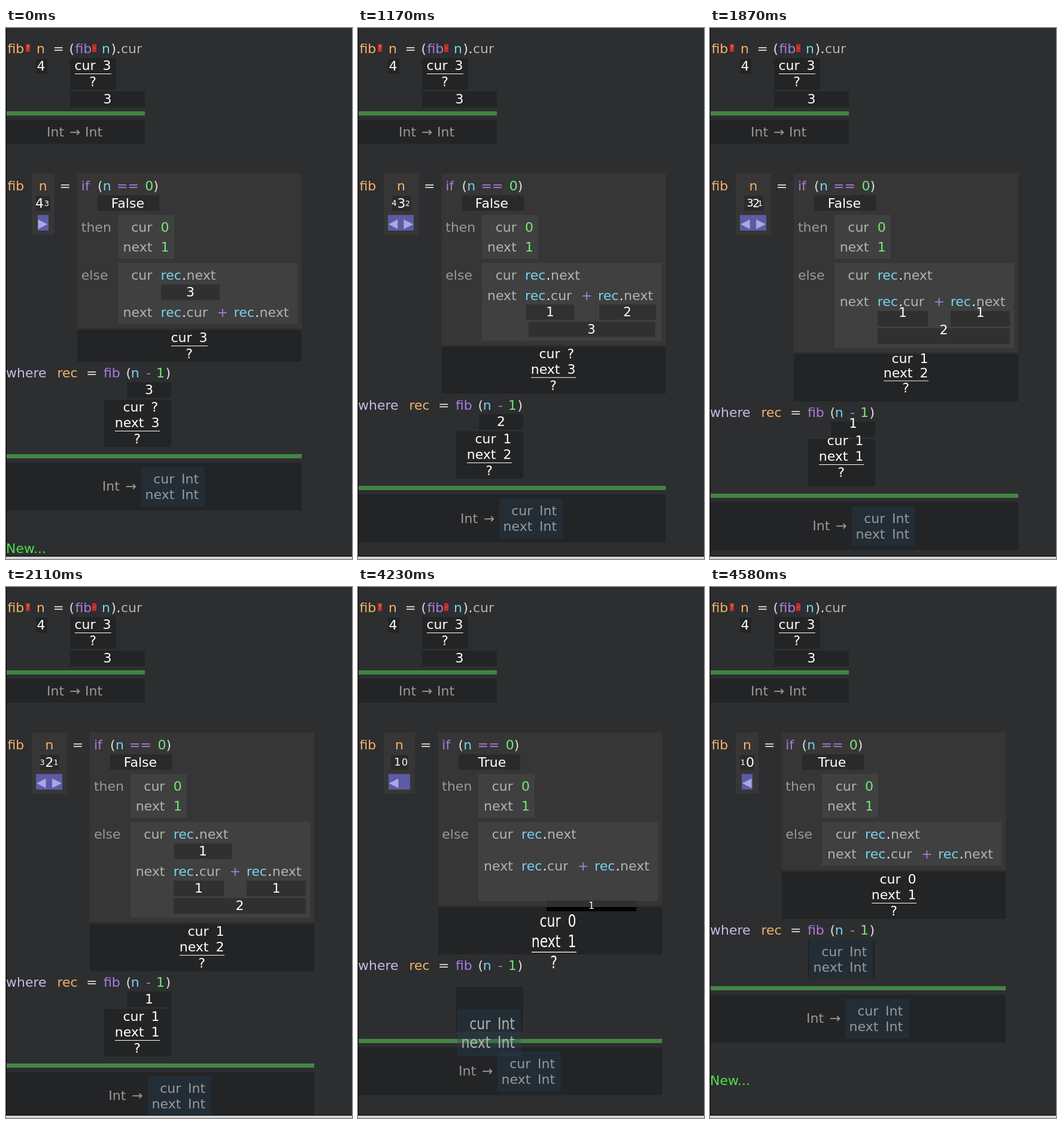
An HTML page with a canvas that plays this animation: 578 by 886 pixels, repeating every 4900 ms.

```html
<!DOCTYPE html>
<html lang="en">
<head>
<meta charset="utf-8">
<title>Stepping through fib</title>
<style>
html, body { margin: 0; width: 100%; height: 100%; overflow: hidden; background: #2d2e30; }
canvas { display: block; }
</style>
</head>
<body>
<canvas id="stage" width="578" height="886"></canvas>
<script>
const ctx = document.getElementById('stage').getContext('2d');
const LOOP = 4900, DECAY = 0.0194;
const C = {
  bg: '#2d2e30', dark: '#232426', body: '#363636', inner: '#404040', value: '#303030',
  slot: '#2a2a2a', white: '#ffffff', pale: '#dedede', label: '#b2b2b2', dim: '#999999',
  orange: '#f4b266', purple: '#aa7bdc', cyan: '#78d2ec', green: '#78e878', lilac: '#c3bce2',
  bar: '#448544', record: 'rgba(38,68,87,.3)', red: '#bd2f26',
  slider: '#5d5ba5', arrow: '#a9a8e0', fresh: '#4be34b'
};

// Layout: bx = body left, yN = "next" row, elseB = bottom of the else record,
// resH = result height, fo / fh = offset and height of the box below "where".
const wide = { bx: 140.4, yN: 475, elseB: 552, resH: 79, fo: 44, fh: 79 };
const first = { ...wide, bx: 119.3, yN: 475, elseB: 494, resH: 53 };
const three = { ...wide, yN: 446, elseB: 523 };
const last = { ...wide, bx: 119.8, yN: 446, elseB: 465, fo: 15, fh: 66 };
const still = { dx: 0, dy: 0, resDy: 0, sc: 1 };

// Digit entries: char, x and size at the start, x and size at rest.
const slide = (a, b, c) => [[a, 67, 18, 60.5, 13], [b, 77, 19, 72.5, 22], [c, 84, 13, 83.5, 13]];
const pair = (a, b) => [['cur', a], ['next', b]];

const phases = [
  { t0: 0, steps: 0, n: 4, a: first, b: first, ...still,
    digits: [['4', 56, 22, 56, 22], ['3', 68, 13, 68, 13]],
    curV: '3', res: [['cur', '3']], arg: '3', frac: pair('?', '3') },
  { t0: 1010, gap: 160 / 3, steps: 6, n: 3, b: three,
    a: { ...wide, bx: 126.3, yN: 465, elseB: 504, resH: 61 },
    dx: -7, dy: -18, resDy: -24, sc: 0.87, enterSum: true,
    digits: [['4', 57, 19, 60.5, 13], ['3', 70, 16, 72.5, 22], ['2', 71, 13, 83.5, 13]],
    sum: ['1', '2', '3'], res: pair('?', '3'), arg: '2', frac: pair('1', '2') },
  { t0: 1870, gap: 140 / 3, steps: 6, n: 2, b: wide,
    a: { ...wide, yN: 457, elseB: 534 },
    dx: 0, dy: -10, resDy: -4, sc: 0.93, enterCur: true,
    digits: slide('3', '2', '1'),
    curV: '1', sum: ['1', '1', '2'], res: pair('1', '2'), arg: '1', frac: pair('1', '1') },
  { t0: 3000, gap: 50, steps: 2, n: 1, a: wide, b: wide, ...still,
    digits: slide('2', '1', '0'),
    curV: '1', sum: ['0', '1', '1'], res: pair('1', '1'), arg: '0', frac: pair('0', '1') },
  { t0: 4230, gap: 50, steps: 7, n: 0, b: last,
    a: { bx: 133.8, yN: 466, elseB: 524, resH: 79, fo: 35, fh: 75 },
    dx: 6, dy: 0, resDy: 7, sc: 1.3, leaving: '1',
    digits: [['1', 66, 18, 55, 13], ['0', 78, 16, 67, 22]],
    res: pair('0', '1') }
];

const mix = (rest, start, e) => rest + (start - rest) * e;

function box(l, t, r, b, color) {
  const x = Math.round(l), y = Math.round(t);
  ctx.fillStyle = color;
  ctx.fillRect(x, y, Math.round(r) - x, Math.round(b) - y);
}

// y is the middle of the line; the baseline sits on a whole pixel
function text(s, x, y, color, align = 'left', size = 22) {
  ctx.font = `${size}px "DejaVu Sans", sans-serif`;
  ctx.textAlign = align;
  ctx.fillStyle = color;
  ctx.fillText(s, x, Math.round(y + size * 0.364 - 0.7));
}

// Items: [string, x, color]
const line = (y, items) => items.forEach(([s, x, color]) => text(s, x, y, color));

function scaled(x, y, sx, sy, draw) {
  ctx.save();
  ctx.translate(Math.round(x), Math.round(y));
  ctx.scale(sx, sy);
  draw();
  ctx.restore();
}

function valueBox(cx, cy, w, s, color, textDy = 0) {
  box(cx - w / 2, cy - 13, cx + w / 2, cy + 13, color);
  text(s, cx, cy + textDy, C.white, 'center');
}

function fraction(cx, top, rows, sy = 1) {
  const w = rows.length > 1 ? 75 : 61, left = -w / 2;
  scaled(cx, top, 1, sy, () => {
    rows.forEach(([name, v], i) => {
      text(name, w / 2 - 26, 13 + 26 * i, C.white, 'right');
      text(v, w / 2 - 14, 13 + 26 * i, C.white);
    });
    const y = 26 * rows.length;
    box(left, y, left + w, y + 1, C.white);
    text('?', 0, y + 13.5, C.white, 'center');
  });
}

function recordType(x, top, sy = 1, color = C.dim) {
  scaled(x, top, 1, sy, () => {
    box(0, 0, 106, 66, C.record);
    ['cur', 'next'].forEach((name, i) => {
      text(name, 55.3, 20.5 + 26 * i, color, 'right');
      text('Int', 67, 20.5 + 26 * i, color);
    });
  });
}

function triangle(x, w) {
  ctx.fillStyle = C.arrow;
  ctx.beginPath();
  ctx.moveTo(x, 319.5);
  ctx.lineTo(x + w, 327.5);
  ctx.lineTo(x, 335.5);
  ctx.fill();
}

function drawCall() {
  line(34.5, [['fib', 2.5, C.orange], ['n', 51, C.orange], ['=', 78.5, C.pale],
    ['(', 105.5, C.pale], ['fib', 115.5, C.purple], ['n', 160, C.cyan],
    [')', 175.5, C.pale], ['.', 184.5, C.white], ['cur', 192, C.label]]);
  [[33, '?'], [144, '-']].forEach(([x, s]) => {
    box(x, 27, x + 7, 40, C.red);
    text(s, x + 3.5, 34, '#f0c0b8', 'center', 8);
  });
  box(50, 51, 69, 76, C.dark);
  text('4', 58.5, 63.5, C.white, 'center');
  box(107, 50, 184, 103, C.dark);
  fraction(145, 50, [['cur', '3']]);
  valueBox(169.5, 119, 125, '3', C.dark);
  box(1, 139, 232, 146, C.bar);
  box(1, 153, 232, 193, C.dark);
  line(173.5, [['Int', 68, C.dim], ['→', 106, C.dim], ['Int', 132, C.dim]]);
}

function drawArgument(p, bx, e) {
  const d = bx - 119.3, right = bx - 38.7;
  box(43, 243, right, 345, C.body);
  text('n', (43 + right) / 2, 264, C.orange, 'center');
  box(50.3 + d * 0.32, 280, 74 + d * 0.72, 305, C.slot);
  p.digits.forEach(([s, x0, s0, x1, s1]) =>
    text(s, mix(x1, x0, e), 292.5, C.white, 'center', mix(s1, s0, e)));
  const l = 53 - d * 0.14, r = 70.5 + d * 1.12;
  box(l, 312, r, 338, C.slider);
  if (p.n < 4) {
    const w = p.n === 3 ? mix(15.5, 9, e) : 15.5;
    triangle(l + 1 + w, -w);
  }
  if (p.n > 0) triangle(r - 17, 16);
}

// A value that grows into place while entering
function growing(cx, cy, w, s, e, dx, dy) {
  scaled(cx + dx * e, cy + dy * e, 1 - 0.95 * e, 1 - 0.6 * e,
    () => valueBox(0, 0, w, s, C.value));
}

function drawBody(p, L, e) {
  const { bx, yN, elseB } = L;
  box(bx, 243, bx + 374.5, elseB + 7, C.body);
  line(264, [['if', bx + 6.5, C.purple], ['(', bx + 33.7, C.pale], ['n', bx + 42.5, C.cyan],
    ['==', bx + 65.7, C.purple], ['0', bx + 113, C.green], [')', bx + 127, C.pale]]);
  box(bx + 34, 279, bx + 137, 305, C.slot);
  text(p.n ? 'False' : 'True', bx + 84 + p.dx * e, 292.5, C.white, 'center');

  const name = (s, y) => text(s, bx + 125, y, C.label, 'right');
  text('then', bx + 6.5, 333, C.dim);
  box(bx + 67.5, 312, bx + 161.5, 385, C.inner);
  name('cur', 333);
  name('next', 366);
  text('0', bx + 139.3, 333, C.green);
  text('1', bx + 139.3, 366, C.green);

  text('else', bx + 6.5, 413, C.dim);
  box(bx + 67.5, 392, bx + 367.5, elseB, C.inner);
  if (p.curV) growing(bx + 188.5, 441, 98, p.curV, p.enterCur ? e : 0, -10, -23);
  const field = (x, y, s) => line(y,
    [['rec', bx + x, C.cyan], ['.', bx + x + 35.5, C.white], [s, bx + x + 43, C.label]]);
  name('cur', 413);
  field(139.3, 413, 'next');
  name('next', yN);
  field(139.3, yN, 'cur');
  text('+', bx + 242.3, yN, C.purple, 'center');
  field(261.3, yN, 'next');

  if (!p.sum) return;
  const spots = [[181.5, 28, 84, -10], [311, 28, 99, -17], [250, 57, 221, 0]];
  spots.forEach(([x, y, w, dx], i) => {
    if (!p.enterSum) valueBox(bx + x, yN + y, w, p.sum[i], C.value, p.dy * e);
    else if (i < 2 || e < 1) growing(bx + x, yN + y, w, p.sum[i], e, dx, -12);
  });
}

// The old total shrinks away, darker where it covers the result
function drawLeaving(s, resTop, e) {
  const k = 0.68 * e, w = 110.5 * k, h = 13 * k;
  box(390 - w, 532 - h, 390 + w, 532 + h, C.value);
  box(390 - w, Math.min(resTop, 532 + h), 390 + w, 532 + h, '#000');
  text(s, 390, 532, C.white, 'center', 22 * k);
}

function drawDefinition(p, L, e) {
  const { bx, elseB, resH, fo, fh } = L;
  const right = bx + 374.5, half = (bx - 119.3) / 2;
  text('fib', 2.5, 264, C.orange);
  text('=', bx - 20.5, 264, C.pale, 'center');
  drawArgument(p, bx, e);
  drawBody(p, L, e);

  const resTop = elseB + 10, where = resTop + resH + 19;
  box(bx, resTop, right, resTop + resH, C.dark);
  if (p.leaving && e > 0) drawLeaving(p.leaving, resTop, e);
  fraction(bx + 187 + p.dx * e, resTop + p.resDy * e, p.res, mix(1, p.sc, e));

  line(where, [['where', 0, C.lilac], ['rec', 85.5, C.orange], ['=', 134, C.pale],
    ['fib', 163, C.purple], ['(', 200.5, C.pale], ['n', 208.7, C.cyan], ['-', 234, C.purple],
    ['1', 251, C.green], [')', 266.5, C.pale]]);
  const top = where + fo, bar = top + fh + 12;
  if (p.arg) valueBox(239, where + 28, 74, p.arg, C.dark, p.dy * e);
  box(163, top, 276, top + fh, C.dark);
  if (p.frac) fraction(219.4, top + p.dy * e, p.frac);

  box(1, bar, right, bar + 7, C.bar);
  box(1, bar + 14, right, bar + 94, C.dark);
  line(bar + 54, [['Int', 160.8 + half, C.dim], ['→', 199.7 + half, C.dim]]);
  recordType(226 + half, bar + 21);
  if (!p.frac) recordType(166, top + 37 * e, 1 + 0.197 * e, e > 0 ? C.label : C.dim);
  text('New...', 0, bar + 158, C.fresh);
}

function draw(t) {
  const p = phases.findLast(q => t >= q.t0);
  let e = 0;
  if (p.steps) {
    const at = i => Math.round(p.gap * i / 10) * 10;
    let i = 0;
    while (i < p.steps && t - p.t0 >= at(i + 1)) i++;
    e = i < p.steps ? Math.exp(-DECAY * at(i)) : 0;
  }
  const L = {};
  for (const key in p.b) L[key] = mix(p.b[key], p.a[key], e);

  box(0, 0, 578, 886, C.bg);
  drawCall();
  drawDefinition(p, L, e);
  box(0, 0, 1, 886, '#000');
  box(0, 881, 578, 882, '#000');
  box(0, 882, 578, 886, '#d4d4d4');
}

const start = performance.now();
function tick() {
  draw((performance.now() - start) % LOOP);
  requestAnimationFrame(tick);
}
tick();
</script>
</body>
</html>
```
